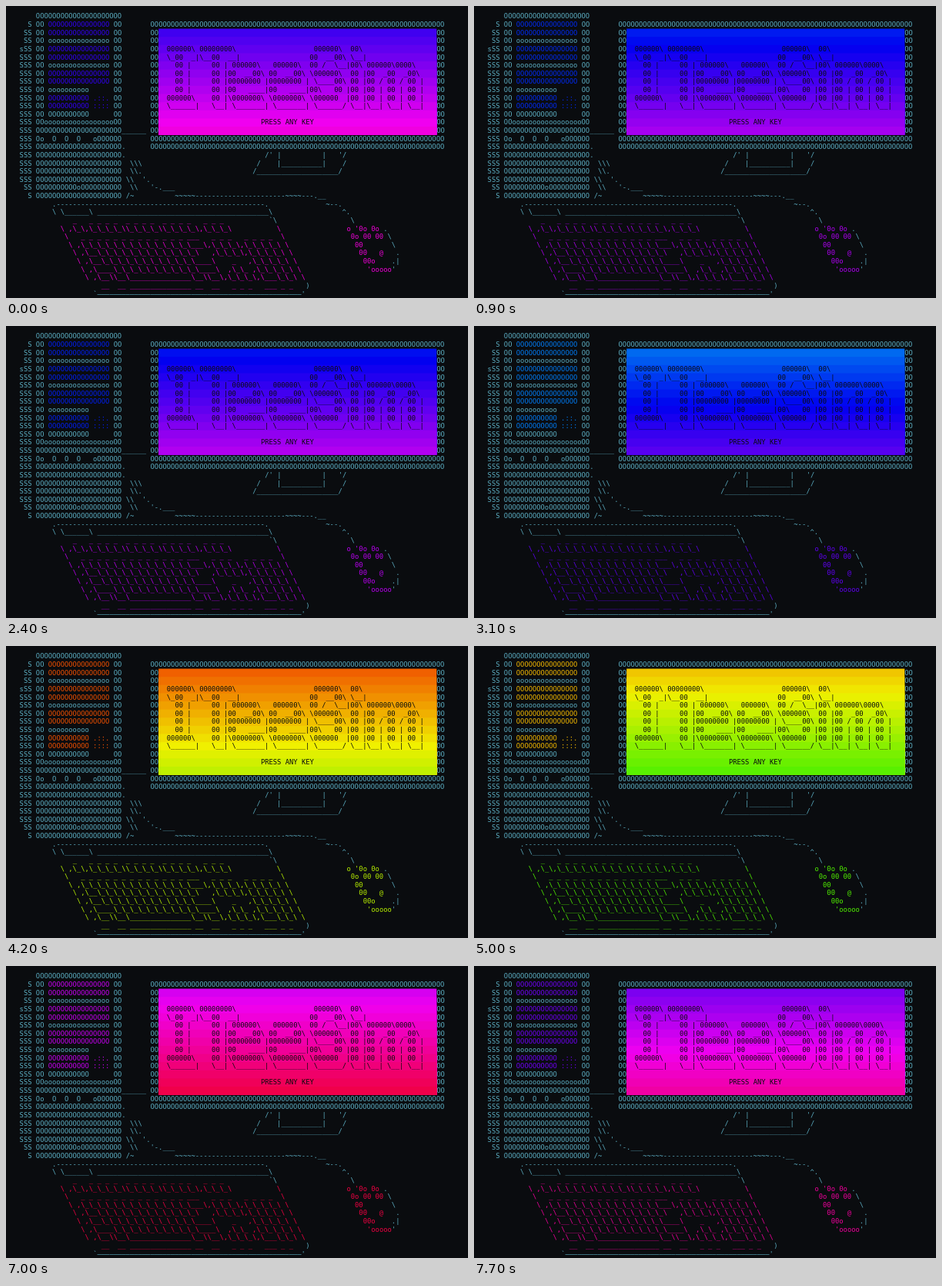
Recreate the animation shown at these times as an HTML page with a canvas. Size 600 by 380 pixels, loop 7800 ms.

```html
<!DOCTYPE html>
<html lang="en">
<head>
<meta charset="utf-8">
<title>ASCII computer</title>
<style>
html, body { margin: 0; height: 100%; overflow: hidden; background: #0a0c0f; }
canvas { display: block; }
</style>
</head>
<body>
<canvas id="stage" width="600" height="380"></canvas>
<script>
const ctx = document.getElementById('stage').getContext('2d');
const LOOP = 7800, BACK = '#0a0c0f', CYAN = '#5bacc0';
const raw = String.raw;
const line = (ch, n) => ch.repeat(n);
const keys = n => line('\\_', n);
const tick = '`';

const cables = raw`
______

.
.
  \\\
  \\.
 \\  '.
  \\   '-.___
 /~          ~~~~~${line('-', 22)}~~~~---.__
`;

const stand = raw`
   /' |          |   '/
 /    |__________|    /
/${line('_', 20)}/
`;

const board = raw`
.${line('-', 51)}.              ~--.
\ \______\ ${line('_', 42)}\                 ^.
${line(' ', 53)}${tick}\                  \







${line(' ', 62)})
          ${tick}${line('—', 50)}'
`;

const keyboard = raw`
   _   _ _ _ _  _ _ _ _  _ _ _ _   _ _ _
\ ,\_\,\_\_\_\_\\_\_\_\_\\_\_\_\_\,\_\_\_\           \
 \   ${line('_ ', 13)}___   _ _ _   _ _ _ _  \
  \ ,${keys(13)}\___\,\_\_\_\,\_\_\_\_\ \
   \ ,\__${keys(12)}\   ,\_\_\_\,\_\_\_\_\ \
    \ ,\__${keys(11)}\____\    _   ,\_\_\_\_\ \
     \ ,\____${keys(10)}\____\  ,\_\_ ,\_\_\_\_\ \
      \ ,\__\\__\_______________\__\\__\,\_\_\_\,\___\_\_\ \
          __  __ _______________ __  __   _ _ _   ___ _ _
`;

const mouse = raw`
o '0o 0o
 0o 00 00
  00
   00   @
    00o
     'ooooo
`;

const mouseEdge = raw`
.
 \
  \
   .
  .|
  '
`;

const title = raw`
000000\ 00000000\                   000000\  00\
\_00  _|\__00  __|                 00  __00\ \__|
  00 |     00 | 000000\   000000\  00 /  \__|00\ 000000\0000\
  00 |     00 |00  __00\ 00  __00\ \000000\  00 |00  _00  _00\
  00 |     00 |00000000 |00000000 | \____00\ 00 |00 / 00 / 00 |
  00 |     00 |00   ____|00   ____|00\   00 |00 |00 | 00 | 00 |
000000\    00 |\0000000\ \0000000\ \000000  |00 |00 | 00 | 00 |
\______|   \__| \_______| \_______| \______/ \__|\__| \__| \__|

                       PRESS ANY KEY
`;

// Text is laid out on a grid of 8 x 16 cells.
function put(row, col, text, color) {
  ctx.fillStyle = color;
  text.replace(/^\n/, '').split('\n').forEach((s, i) => {
    const indent = s.search(/\S/);
    if (indent >= 0) ctx.fillText(s.slice(indent), (col + indent) * 8, (row + i) * 16 + 12.2);
  });
}

const hue = h => `hsl(${h} 100% 47%)`;

function tower(color) {
  const wide = line('O', 21);
  const slots = { 3: line('o', 15), 6: line('o', 15), 9: line('o', 10), 12: line('O', 10) };
  const lights = { 10: 'OOOOOOOOOO .::.', 11: 'OOOOOOOOOO ::::' };
  const solid = { 13: `OO${line('o', 17)}OO`, 15: 'Oo  O  O  O   oOOOOOO', 21: 'OOOOOOOOOOoOOOOOOOOOO' };
  const shade = { 1: '  S', 2: ' SS', 3: ' SS', 4: 'sSS', 21: ' SS', 22: '  S' };
  put(0, 4, wide, CYAN);
  for (let row = 1; row <= 22; row++) {
    put(row, 0, shade[row] || 'SSS', CYAN);
    if (row > 12) {
      put(row, 4, solid[row] || wide, CYAN);
      continue;
    }
    put(row, 4, 'OO', CYAN);
    put(row, 23, 'OO', CYAN);
    if (slots[row]) put(row, 7, slots[row], CYAN);
    else put(row, 7, lights[row] || line('O', 15), color);
  }
}

function monitor(h) {
  for (const row of [1, 15, 16]) put(row, 32, line('O', 72), CYAN);
  for (let row = 2; row < 15; row++) {
    put(row, 32, 'OO', CYAN);
    put(row, 102, 'OO', CYAN);
  }
  for (let row = 2; row < 15; row++) {
    ctx.fillStyle = hue(h + (row - 2) * 4);
    ctx.fillRect(34 * 8, row * 16, 68 * 8, (15 - row) * 16);
  }
  put(4, 36, title, BACK);
  put(17, 57, stand, CYAN);
}

function draw(step) {
  const h = 256 + step * 48.2;
  ctx.setTransform(1, 0, 0, 1, 0, 0);
  ctx.fillStyle = BACK;
  ctx.fillRect(0, 0, 600, 380);
  ctx.setTransform(0.6638, 0, 0, 0.6638, 17.6, 8.3);
  ctx.font = '13.288px "DejaVu Sans Mono", monospace';
  tower(hue(h - 4));
  monitor(h);
  put(14, 25, cables, CYAN);
  put(23, 8, board, CYAN);
  put(26, 89, mouseEdge, CYAN);
  put(25, 10, keyboard, hue(h + 50));
  put(26, 80, mouse, hue(h + 50));
}

let shown = -1;
function tick60() {
  const t = performance.now() % LOOP;
  const step = Math.max(0, Math.floor(t / 100) - 2);
  if (step !== shown) draw(shown = step);
  requestAnimationFrame(tick60);
}
tick60();
</script>
</body>
</html>
```
